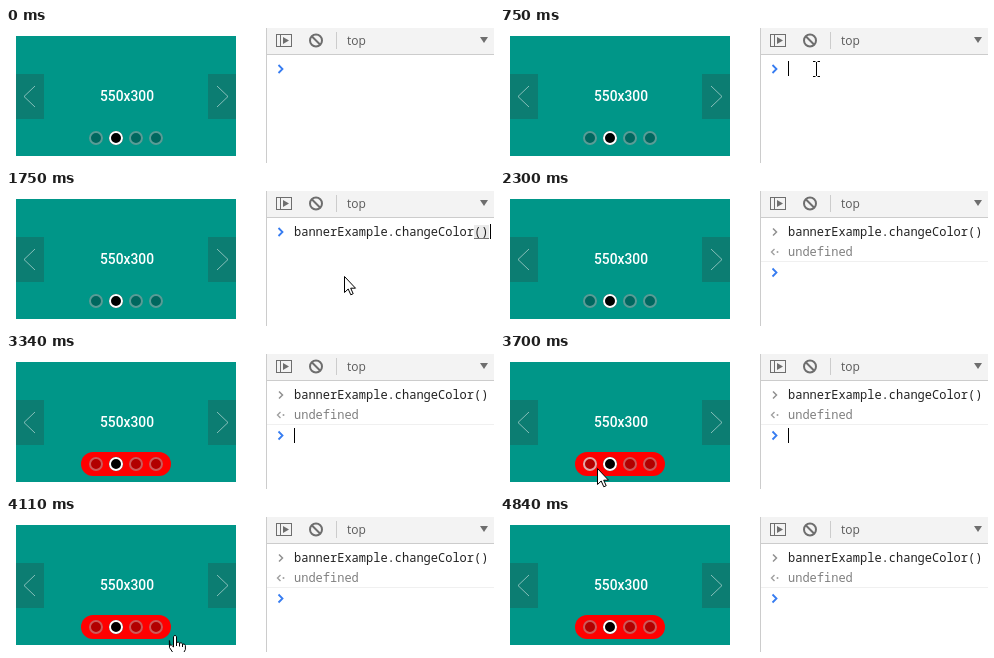
Write an HTML page with a canvas that moves like this. It is 488 by 135 pixels and loops after 5120 ms.

```html
<!DOCTYPE html>
<html lang="en">
<head>
<meta charset="utf-8">
<title>Banner and console</title>
<style>
html, body { margin: 0; width: 100%; height: 100%; overflow: hidden; background: #fff; }
canvas { display: block; }
</style>
</head>
<body>
<canvas id="stage" width="488" height="135"></canvas>
<script>
const c = document.getElementById('stage').getContext('2d');
const LOOP = 5120, PASTE = 1690, ENTER = 2300, RESULT = 2360;
const CODE = 'bannerExample.changeColor()';
const MONO = '12px "Noto Sans Mono", "DejaVu Sans Mono", monospace';
const LABEL = size => `500 condensed ${size}px Roboto, "Open Sans", sans-serif`;
const CARET_ON = [[750, 1270], [PASTE, 2180], [RESULT, 2850], [3340, 3850], [4350, 4840]];

// Pointer moves: start, step in ms, positions; the last position holds.
const MOVES = [
  [210, 60, [[308, 131], [308, 113], [309, 96], [309, 80], [310, 66], [314, 51], [316, 44], [316, 41]]],
  [1090, 60, [[319, 42]]],
  [1520, 57.5, [[318, 38], [323, 45], [329, 56], [334, 70], [338, 85], [341, 114], null]],
  [3400, 60, [[44, 95], [26, 70]]],
  [3610, 45, [[50, 88], [74, 101], [97, 114]]],
  [3730, 63.3, [[104, 113], [114, 112], [126, 113], [138, 114], [150, 115], [161, 117], [169, 118]]],
  [4170, 60, [[170, 121], [171, 130], null]]
];

const ARROW = new Path2D('M.5 .5V16.5L4.2 13L6.8 18.8L9.2 17.7L6.7 12.2H11.5Z');
const HAND = new Path2D('M-1.5 1.5Q0-1 1.5 1.5V7.5Q3.5 6.5 4.5 8Q6.5 7.2 7.5 9Q10 8.6 10.4 10.5V14.5L8.5 18V21H-1.5V18.5L-5.5 12.5Q-6-.1-5 10Q-3.5 9.5-1.5 12Z');
const KNUCKLES = new Path2D('M1.5 7V11M4.5 8V11.5M7.5 9V12');
const BEAM = new Path2D('M-3-7.5H-.5M1.5-7.5H4M-3 7.5H-.5M1.5 7.5H4M.5-7V7');

function rect(x, y, w, h, color) {
  c.fillStyle = color;
  c.fillRect(x, y, w, h);
}

function line(points, color, width = 1) {
  c.beginPath();
  points.forEach(p => c.lineTo(...p));
  c.strokeStyle = color;
  c.lineWidth = width;
  c.stroke();
}

function disc(x, y, r, fill, stroke, width) {
  c.beginPath();
  c.arc(x, y, r, 0, 7);
  if (fill) { c.fillStyle = fill; c.fill(); }
  if (!stroke) return;
  c.beginPath();
  c.arc(x, y, r - width / 2, 0, 7);
  c.strokeStyle = stroke;
  c.lineWidth = width;
  c.stroke();
}

function triangle(points, color) {
  c.beginPath();
  points.forEach(p => c.lineTo(...p));
  c.fillStyle = color;
  c.fill();
}

function text(s, x, y, font, color) {
  c.font = font;
  c.fillStyle = color;
  c.fillText(s, x, y);
}

const chevron = (x, y, w, h, color, width) =>
  line([[x, y - h], [x + w, y], [x, y + h]], color, width);

const near = (p, x, y, r) => p && Math.hypot(p[0] - x, p[1] - y) < r;
const inside = (p, x, y, w, h) => p && p[0] >= x && p[0] < x + w && p[1] >= y && p[1] < y + h;

function pointerAt(t) {
  const move = MOVES.filter(m => t >= m[0]).pop();
  if (!move) return null;
  const [start, step, points] = move;
  return points[Math.min(points.length - 1, Math.floor((t - start) / step + .01))];
}

function drawBanner(t, p) {
  rect(10, 8, 220, 120, '#009688');
  for (const [x, tip, dir] of [[10, 29, -1], [202, 211, 1]]) {
    rect(x, 46, 28, 45, `rgba(51,51,51,${inside(p, x, 46, 28, 45) ? .45 : .25})`);
    chevron(tip, 68.5, 11 * dir, 10.5, 'rgba(255,255,255,.5)', 1);
  }
  c.font = LABEL(20);
  const size = 20 * 54 / c.measureText('550x300').width;
  c.textAlign = 'center';
  text('550x300', 121, 68 + size * .36, LABEL(size), '#fff');
  c.textAlign = 'left';

  if (t >= RESULT) {
    c.beginPath();
    c.roundRect(75, 98, 90, 24, 12);
    c.fillStyle = '#f00';
    c.fill();
  }
  for (let i = 0; i < 4; i++) {
    const x = 90 + 20 * i, active = i === 1;
    const ring = active ? 1 : near(p, x, 110, 9) ? .65 : .35;
    disc(x, 110, 7, active ? '#000' : 'rgba(0,0,0,.3)', `rgba(255,255,255,${ring})`, 2);
  }
}

function drawToolbar() {
  rect(260, 0, 228, 27, '#f3f3f3');
  rect(260, 26, 228, 1, '#ccc');
  rect(260, 0, 1, 135, '#ccc');
  const gray = '#6e6e6e';
  c.strokeStyle = gray;
  c.lineWidth = 1;
  c.strokeRect(270.5, 6.5, 15, 12);
  line([[274.5, 6], [274.5, 19]], gray);
  triangle([[277, 9], [283, 12.5], [277, 16]], gray);
  disc(310, 12.5, 7, null, gray, 2);
  line([[305.5, 8], [314.5, 17]], gray, 2);
  rect(330, 4, 1, 17, '#ccc');
  text('top', 341, 17, '12px "Open Sans", "Noto Sans", sans-serif', '#5a5a5a');
  triangle([[474, 9], [482, 9], [478, 15]], gray);
}

function drawConsole(t) {
  const done = t >= ENTER, typed = t >= PASTE;
  if (typed && !done) {
    rect(468, 34, 15, 14, 'rgba(0,0,0,.08)');
    rect(468, 47, 15, 1, 'rgba(0,0,0,.5)');
  }
  if (typed) text(CODE, 288, 45, MONO, '#222');
  if (done) {
    chevron(273, 41, 3.5, 3.5, '#919191', 1.5);
    chevron(274.5, 61, -3, 3, '#a0a0a0', 1.4);
    disc(277.5, 61, 1, '#a0a0a0');
    text('undefined', 288, 65, MONO, '#808080');
    rect(261, 70, 227, 1, '#f0f0f0');
  }
  chevron(272.5, done ? 81.5 : 41, 4, 4, '#367cf1', 1.8);
  if (CARET_ON.some(([on, off]) => t >= on && t < off))
    rect(typed && !done ? 484 : 288, done ? 74 : 33, 1, 15, '#000');
}

function drawPointer(p) {
  if (!p) return;
  const [x, y] = p;
  const onPill = inside(p, 75, 98, 90, 24);
  const onDot = [90, 110, 130, 150].some(dx => near(p, dx, 110, 7));
  c.save();
  c.translate(x, y);
  c.strokeStyle = '#000';
  c.fillStyle = '#fff';
  c.lineWidth = 1;
  if (x > 260 && y < 52) {
    c.stroke(BEAM);
  } else {
    const hand = onDot || inside(p, 10, 8, 220, 120) && !onPill;
    const shape = hand ? HAND : ARROW;
    c.fill(shape);
    c.stroke(shape);
    if (hand) c.stroke(KNUCKLES);
  }
  c.restore();
}

function frame(now) {
  const t = now % LOOP, p = pointerAt(t);
  rect(0, 0, 488, 135, '#fff');
  drawBanner(t, p);
  drawToolbar();
  drawConsole(t);
  drawPointer(p);
  requestAnimationFrame(frame);
}
requestAnimationFrame(frame);
</script>
</body>
</html>
```
